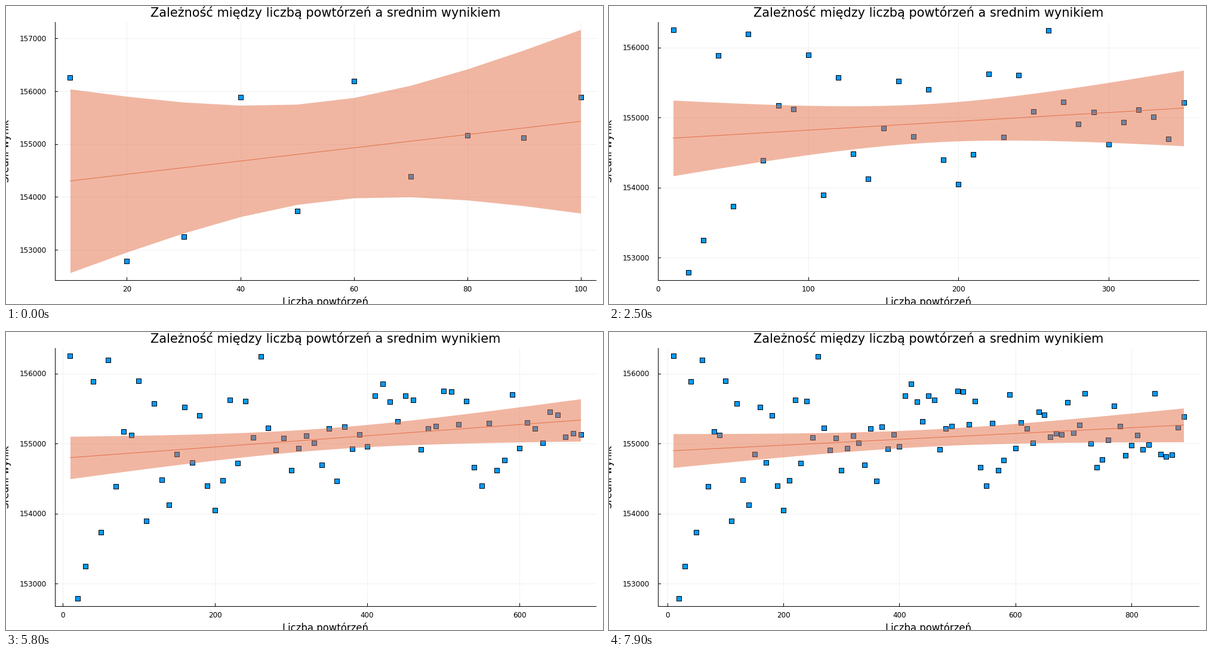
Animation of 1000 by 500 pixels, one loop 8000 ms. Source, as a matplotlib script:

```python
import math

import matplotlib.pyplot as plt
import numpy as np
from matplotlib.animation import FuncAnimation

W, H, DPI = 1000, 500, 100
PX = 72 / DPI                                   # one pixel in points
LEFT, RIGHT, TOP, BOTTOM = 81.85, 988.15, 27.26, 459.74
FRAMES, STEP_MS, FIRST = 80, 100, 10
BLUE, ORANGE = (0.0, 0.6056, 0.9787), (0.8889, 0.4356, 0.2781)

SCORES = 155000 + np.array([
    1257, -2215, -1753, 890, -1267, 1197, -612, 171, 119, 894,
    -1102, 574, -515, -877, -153, 523, -268, 400, -600, -953,
    -528, 621, -281, 604, 85, 1243, 221, -94, 81, -383,
    -68, 111, 9, -306, 217, -532, 243, -77, 132, -43,
    685, 851, 600, 319, 681, 621, -81, 217, 247, 753,
    740, 277, 604, -336, -600, 289, -383, -238, 702, -64,
    298, 213, 9, 455, 409, 94, 145, 128, 591, 153,
    264, 715, 0, -340, -230, 55, 540, 247, -170, -21,
    119, -85, -17, 719, -153, -187, -157, 234, 383])
REPEATS = 10 * np.arange(1, len(SCORES) + 1)


def t_quantile(dof):
    """97.5 % quantile of Student's t by series expansion."""
    z = 1.959964
    return (z + (z**3 + z) / (4 * dof)
            + (5 * z**5 + 16 * z**3 + 3 * z) / (96 * dof**2)
            + (3 * z**7 + 19 * z**5 + 17 * z**3 - 15 * z) / (384 * dof**3))


def fit(x, y):
    """Least-squares line and half width of its confidence band."""
    n, dx = len(x), x - x.mean()
    sxx = (dx**2).sum()
    line = y.mean() + dx * (dx * y).sum() / sxx
    s = math.sqrt(((y - line)**2).sum() / (n - 2))
    return line, t_quantile(n - 2) * s * np.sqrt(1 / n + dx**2 / sxx)


def padded(lo, hi):
    pad = 0.03 * (hi - lo)
    return lo - pad, hi + pad


def nice_ticks(lo, hi):
    """Four to eight round ticks, scored by count, coverage and roundness."""
    span, best, best_score = hi - lo, [], -math.inf
    top = math.floor(math.log10(span))
    for power in (top, top - 1):
        for q, niceness in ((1, 1), (5, 0.9), (2, 0.7), (2.5, 0.5), (3, 0.2)):
            step = q * 10**power
            ticks = np.arange(math.ceil(lo / step), math.floor(hi / step) + 1) * step
            n = len(ticks)
            if not 4 <= n <= 8:
                continue
            score = ((1 - abs(n - 5) / 5) / 4 + 0.5 * span / ((n - 1) * step)
                     + niceness / 4)
            if score > best_score:
                best, best_score = ticks, score
    return best


fig = plt.figure(figsize=(W / DPI, H / DPI), dpi=DPI, facecolor="white")
ax = fig.add_axes([0, 0, 1, 1])
plt.rcParams["font.family"] = "DejaVu Sans"


def label(x, y, text, size, ha="center", **kw):
    ax.text(x, y, text, fontsize=size * PX, ha=ha, va="baseline", color="black", **kw)


def stroke(xs, ys, color="black", width=1, **kw):
    ax.plot(xs, ys, color=color, lw=width * PX, **kw)


def draw(frame):
    n = FIRST + frame
    x, y = REPEATS[:n], SCORES[:n]
    line, half = fit(x, y)
    x_lo, x_hi = padded(x[0], x[-1])
    y_lo, y_hi = padded(min(y.min(), (line - half).min()),
                        max(y.max(), (line + half).max()))

    def px(v):
        return LEFT + (v - x_lo) / (x_hi - x_lo) * (RIGHT - LEFT)

    def py(v):
        return BOTTOM - (v - y_lo) / (y_hi - y_lo) * (BOTTOM - TOP)

    ax.clear()
    ax.set(xlim=(0, W), ylim=(H, 0))
    ax.axis("off")

    for v in nice_ticks(x_lo, x_hi):
        p = px(v)
        stroke([p, p], [TOP, BOTTOM], alpha=0.06, zorder=0)
        stroke([p, p], [BOTTOM, BOTTOM - 4.5], zorder=4)
        label(p, 479, f"{v:.0f}", 12)
    for v in nice_ticks(y_lo, y_hi):
        p = py(v)
        stroke([LEFT, RIGHT], [p, p], alpha=0.06, zorder=0)
        stroke([LEFT, LEFT + 4.5], [p, p], zorder=4)
        label(67.7, p + 4.4, f"{v:.0f}", 12, ha="right")
    stroke([LEFT, LEFT, RIGHT], [TOP, BOTTOM, BOTTOM], zorder=4)

    ax.plot(px(x), py(y), "s", ms=8 * PX, mfc=BLUE, mec="black", mew=PX, zorder=1)
    ax.fill_between(px(x), py(line - half), py(line + half),
                    color=ORANGE, alpha=0.5, lw=0, zorder=2)
    stroke(px(x), py(line), color=ORANGE, zorder=3)

    mid_x, mid_y = (LEFT + RIGHT) / 2, (TOP + BOTTOM) / 2
    label(mid_x + 0.5, 18.5, "Zależność między liczbą powtórzeń a srednim wynikiem", 20.85)
    label(mid_x, 502, "Liczba powtórzeń", 16.5)
    ax.text(5.5, mid_y, "Średni wynik", fontsize=16.5 * PX, rotation=90,
            rotation_mode="anchor", ha="center", va="baseline", color="black")


anim = FuncAnimation(fig, draw, frames=FRAMES, interval=STEP_MS, init_func=lambda: None,
                     repeat=True, repeat_delay=0, blit=False)
plt.show()
```
